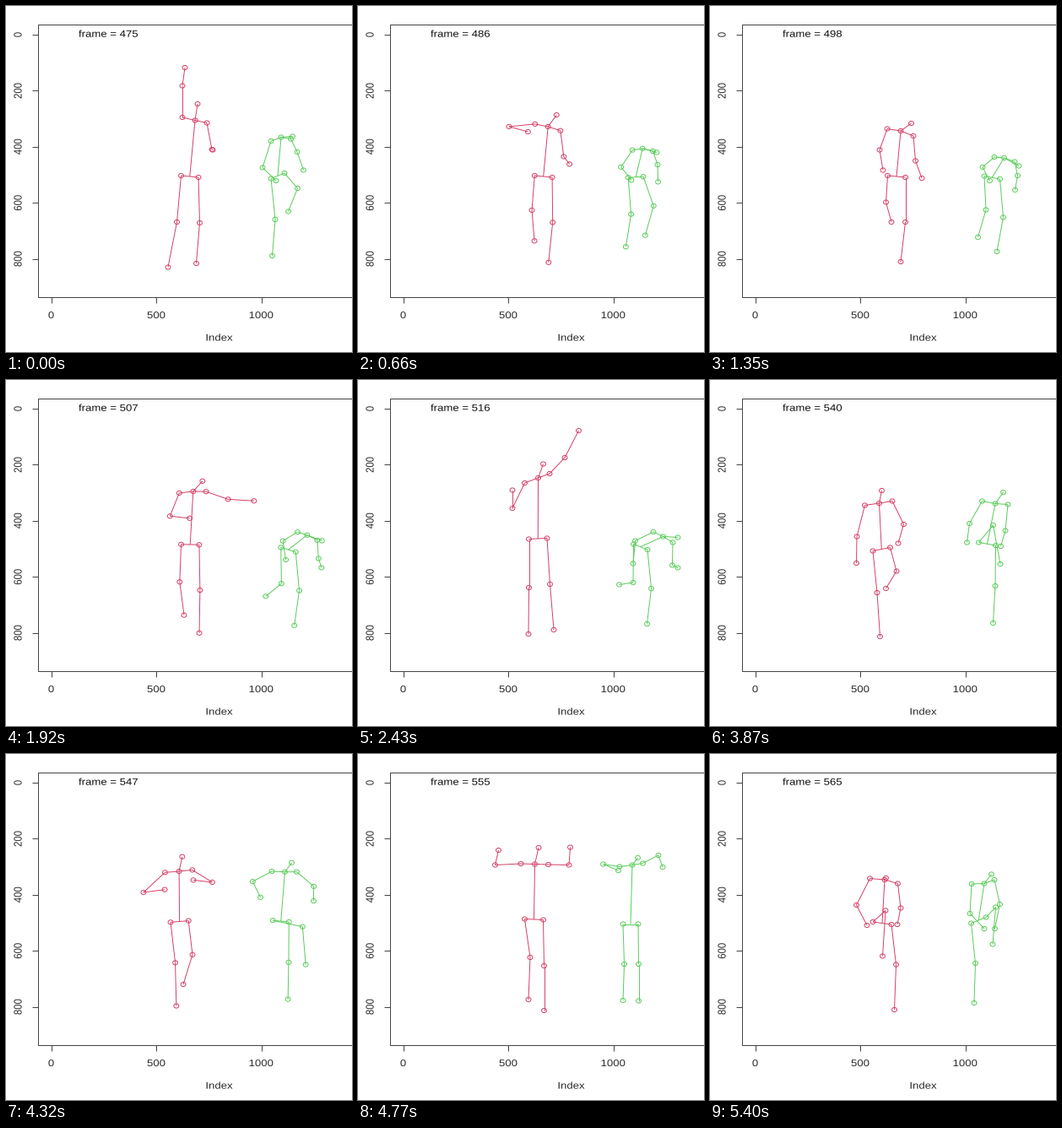
Animation of 410x410 px, one loop 5430 ms. Source, as a matplotlib script:

```python
import numpy as np
import matplotlib.pyplot as plt
from matplotlib.animation import FuncAnimation
from matplotlib.collections import EllipseCollection, LineCollection
from matplotlib.patches import PathPatch
from matplotlib.textpath import TextPath
from matplotlib.transforms import Affine2D

SIZE, DPI = 410, 80
SLOTS, STEP_MS = 181, 30
FIRST = 475
ASPECT = 1.16  # the whole chart is wider than tall by this factor
FONT_PX = 11.35
INK = "#2b2b2b"
RED, GREEN = "#d43a62", "#55cb55"

# Joints: head, neck, then left arm, right arm, left leg, right leg
NECK, L_HIP, R_HIP = 1, 8, 11
PARENT = {0: 1, 2: 1, 3: 2, 4: 3, 5: 1, 6: 5, 7: 6,
          9: 8, 10: 9, 12: 11, 13: 12}


def pose(spine, arm_l, arm_r, leg_l, leg_r):
    return np.array([*spine, *arm_l, *arm_r, *leg_l, *leg_r], float)


red = {}
red[475] = pose([(227, 116), (224, 135.5)],
                [(209, 132), (209, 94.5), (212, 73)],
                [(238, 138.5), (244, 170), (245, 170.5)],
                [(207.5, 201), (202.5, 256), (192, 309.5)],
                [(228, 203), (229.5, 257), (225.5, 305)])
red[498] = pose([(238.5, 139), (226, 148)],
                [(210, 145.5), (201, 170.5), (205, 194.5)],
                [(241, 154), (243.5, 183.5), (251, 204)],
                [(210.5, 201), (208.5, 232.5), (215, 256)],
                [(231.5, 203), (231.5, 256), (226, 303)])
red[516] = pose([(219.5, 99.5), (213.5, 116)],
                [(197.5, 122), (183, 152), (183, 130.5)],
                [(227, 111), (245, 92), (261.5, 60)],
                [(202.5, 188.5), (202.5, 246), (202, 301)],
                [(224, 187.5), (227.5, 242), (232, 296)])
red[528] = pose([(195.5, 126), (198.5, 139.5)],
                [(180, 138.5), (161.5, 168), (155, 160)],
                [(215.5, 139.5), (221, 170), (221, 193.5)],
                [(197, 201), (201, 255), (202.5, 303)],
                [(215.5, 196.5), (234.5, 233.5), (221, 261)])
red[540] = pose([(203.5, 131), (200.5, 146)],
                [(183.5, 148.5), (174, 185.5), (173.5, 217)],
                [(216, 143.5), (229.5, 171), (223, 193.5)],
                [(193, 202.5), (198, 252), (201.5, 304)],
                [(213.5, 198.5), (221, 226.5), (208.5, 247)])
red[555] = pose([(214, 111), (209.5, 130.5)],
                [(193, 130), (162.5, 131.5), (166.5, 114)],
                [(225.5, 131), (250, 131.5), (251.5, 110.5)],
                [(197.5, 195.5), (204, 241), (202, 291)],
                [(219.5, 196.5), (220.5, 251), (220.5, 304)])
red[565] = pose([(208.5, 147), (207, 149)],
                [(189.5, 147.5), (173.5, 179), (186, 203)],
                [(222.5, 153.5), (226, 182.5), (222, 202)],
                [(193, 199), (208, 185.5), (204.5, 239.5)],
                [(215, 202), (220.5, 249.5), (218.5, 303)])

green = {}
green[475] = pose([(339.5, 154.5), (326, 155.5)],
                  [(314, 160), (304, 191.5), (320, 207)],
                  [(337.5, 157.5), (345, 173), (352.5, 194.5)],
                  [(314, 204.5), (319, 253), (315.5, 296)],
                  [(330, 198), (345.5, 216), (334.5, 243.5)])
green[498] = pose([(366, 189.5), (348.5, 180)],
                  [(337, 179), (323, 191), (331.5, 207)],
                  [(361, 184.5), (364.5, 201), (361.5, 218)],
                  [(325, 201.5), (327, 241.5), (317.5, 274)],
                  [(343.5, 205), (347.5, 250.5), (340, 291)])
green[516] = pose([(379, 186.5), (361.5, 185.5)],
                  [(350, 180), (328.5, 190.5), (326, 217.5)],
                  [(373, 192.5), (372.5, 219.5), (379, 222.5)],
                  [(326.5, 194.5), (326, 240), (309.5, 242.5)],
                  [(343, 201), (347.5, 247), (342.5, 289)])
green[528] = pose([(358, 124), (348, 138.5)],
                  [(333, 137.5), (320.5, 164), (331, 187)],
                  [(361.5, 138.5), (372.5, 164), (383.5, 157)],
                  [(330, 190), (340, 219), (327, 247)],
                  [(348.5, 193.5), (349, 241.5), (340, 289.5)])
green[540] = pose([(347.5, 133), (338, 146.5)],
                  [(322.5, 143.5), (307.5, 170), (304.5, 192.5)],
                  [(353, 147.5), (350, 178.5), (344.5, 197)],
                  [(318.5, 192.5), (335.5, 172), (344, 218)],
                  [(338.5, 196), (338, 244), (335.5, 288)])
green[555] = pose([(331.5, 123), (325, 131.5)],
                  [(310, 133.5), (290.5, 130.5), (308.5, 138)],
                  [(337.5, 129.5), (356, 120), (361, 134)],
                  [(314, 201.5), (315.5, 249), (314, 292)],
                  [(332, 201.5), (332.5, 249), (332.5, 292.5)])
green[565] = pose([(333.5, 142.5), (325, 153.5)],
                  [(310, 154), (308, 189), (325, 207)],
                  [(337, 149), (343.5, 178), (337.5, 207)],
                  [(309.5, 200.5), (314.5, 248), (313, 295)],
                  [(327, 193.5), (338.5, 181.5), (335, 225.5)])


def monotone(t, v, x):
    """Monotone cubic through the rows of v at times t."""
    h = np.diff(t)[:, None]
    s = np.diff(v, axis=0) / h
    a, b = s[:-1], s[1:]
    m = np.empty_like(v)
    m[0], m[-1] = s[0], s[-1]
    same = a * b > 0
    m[1:-1] = np.where(same, 2 * a * b / np.where(same, a + b, 1), 0)
    i = np.clip(np.searchsorted(t, x, "right") - 1, 0, len(t) - 2)
    d = h[i]
    u = (x - t[i])[:, None] / d
    return (v[i] * (1 + 2 * u) * (1 - u) ** 2 + m[i] * d * u * (1 - u) ** 2
            + v[i + 1] * u * u * (3 - 2 * u) + m[i + 1] * d * u * u * (u - 1))


def motion(keys, x):
    """Hips and neck glide; every other joint swings about its parent."""
    t = np.array(list(keys), float)
    p = np.array(list(keys.values()))
    out = np.zeros((len(x), *p.shape[1:]))
    for j in (NECK, L_HIP, R_HIP):
        out[:, j] = monotone(t, p[:, j], x)
    for j, k in PARENT.items():
        dx, dy = (p[:, j] - p[:, k]).T
        polar = np.column_stack([np.hypot(dx, dy),
                                 np.unwrap(np.arctan2(dy, dx))])
        r, ang = monotone(t, polar, x).T
        out[:, j] = out[:, k] + np.column_stack([r * np.cos(ang),
                                                 r * np.sin(ang)])
    return out


def px(width):
    return width * 72 / DPI


plt.rcParams["toolbar"] = "None"
fig = plt.figure(figsize=(SIZE / DPI, SIZE / DPI), dpi=DPI, facecolor="white")
ax = fig.add_axes([0, 0, 1, 1])
ax.set(xlim=(0, SIZE), ylim=(SIZE, 0))
ax.axis("off")


def text_path(s, x, y, turn=0, center=True):
    path = TextPath((0, 0), s, size=FONT_PX, prop={"family": "Liberation Sans"})
    box = path.get_extents()
    shift = -(box.x0 + box.x1) / 2 if center else 0
    place = (Affine2D().translate(shift, 0).rotate_deg(turn)
             .scale(ASPECT, -1).translate(x, y))
    return place.transform_path(path)


def write(*args, **kw):
    ax.add_patch(PathPatch(text_path(*args, **kw), fc=INK, lw=0))


def title(n):
    return text_path(f"frame = {n}", 86, 36.7, center=False)


# Plot box, ticks and labels
left, top, bottom = 38, 21.5, 345
lines = [[(SIZE + 5, top), (left, top), (left, bottom), (SIZE + 5, bottom)]]
for i in range(3):
    x = 53.5 + 124.5 * i
    lines.append([(x, bottom), (x, bottom + 7)])
    write(str(500 * i), x, 370)
for i in range(5):
    y = 34 + 66.4 * i
    lines.append([(left - 7, y), (left, y)])
    write(str(200 * i), 18.5, y, turn=90)
write("Index", 253, 396.6)
ax.add_collection(LineCollection(lines, colors="#444444", linewidths=px(1)))
counter = ax.add_patch(PathPatch(title(FIRST), fc="#111111", lw=0))


class Dancer:
    def __init__(self, keys, color):
        self.path = motion(keys, np.arange(FIRST, FIRST + SLOTS // 2 + 1))
        self.bones = LineCollection([], colors=color, linewidths=px(0.95))
        n = self.path.shape[1]
        self.joints = EllipseCollection(
            np.full(n, 5.9), np.full(n, 5.2), np.zeros(n), units="xy",
            offsets=self.path[0], offset_transform=ax.transData,
            facecolors="none", edgecolors=color, linewidths=px(0.95))
        ax.add_collection(self.bones)
        ax.add_collection(self.joints)

    def show(self, step):
        p = self.path[step]
        waist = (p[L_HIP] + p[R_HIP]) / 2
        segs = [(p[j], p[k]) for j, k in PARENT.items()]
        segs += [(p[L_HIP], p[R_HIP]), (p[NECK], waist)]
        self.bones.set_segments(segs)
        self.joints.set_offsets(p)


dancers = [Dancer(red, RED), Dancer(green, GREEN)]


def draw(slot):
    step = (slot + 1) // 2
    counter.set_path(title(FIRST + step))
    for d in dancers:
        d.show(step)
    return []


anim = FuncAnimation(fig, draw, frames=SLOTS, interval=STEP_MS,
                     init_func=lambda: draw(0), repeat=True, repeat_delay=0)
plt.show()
```
